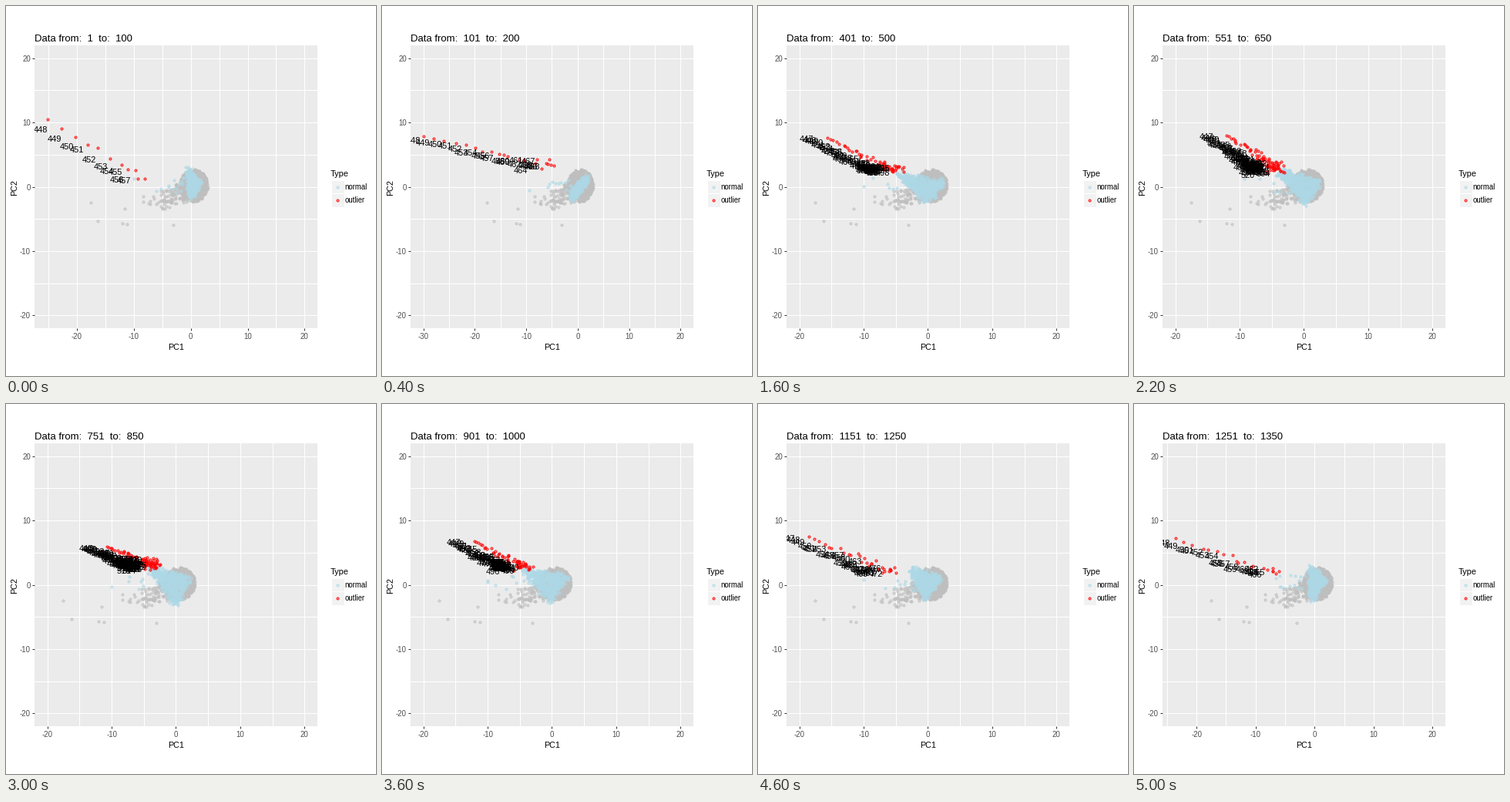
A matplotlib script that plays this animation: 480x480 px, repeating every 5200 ms.

```python
import numpy as np
import matplotlib.pyplot as plt
from matplotlib.animation import FuncAnimation
from matplotlib.patches import Rectangle
from matplotlib.transforms import ScaledTranslation

SIZE, DPI = 480, 100
FRAMES, STEP_MS = 26, 200
LEFT, TOP, SIDE = 37, 51, 367
GRAY, BLUE, RED = (0.745,) * 3, (0.678, 0.847, 0.902), (1, 0, 0)
FIRST_ID = 447

# Key poses by window: corners of the normal cloud, then the far and near
# ends of the outlier trail and how many outliers lie on it.
POSES = {
    0: [(-0.5, 2.6), (0, -1.5), (1.4, 0.6), (-25.2, 10.5), (-8.5, 1.4), 11],
    2: [(-1.4, -1.9), (0.2, 0), (1.8, 1.4), (-30, 7.8), (-5, 3.4), 22],
    5: [(-5.2, 1), (-0.6, -1.8), (2.7, 0.6), (-19.3, 7.3), (-6, 2.2), 34],
    11: [(-4.2, 2.8), (0.2, -2.7), (2.3, 0.8), (-12, 8), (-4.5, 3), 78],
    15: [(-4.2, 2.8), (0, -3.2), (2.1, 1), (-10.7, 5.9), (-3.8, 3.3), 84],
    21: [(-4.6, 1.9), (-0.4, -1.9), (2.2, 1.6), (-13.5, 7.7), (-5, 2.2), 42],
    25: [(-0.8, 2.9), (-0.6, -2.2), (1.6, 0.7), (-23.6, 7.2), (-7, 2), 20],
}
KEYS = sorted(POSES)
TABLE = np.array([np.hstack(POSES[k]) for k in KEYS])

plt.rcParams["font.family"] = "Liberation Sans"
plt.rcParams["axes.unicode_minus"] = False


def px(n):
    """Pixels to points."""
    return n * 72 / DPI


def scatter_noise(rng, n):
    return np.clip(rng.normal(size=(n, 2)), -1.9, 1.9)


def base_cloud():
    """Round core, a thinning tail to the lower left and a few far points."""
    rng = np.random.default_rng(4)
    angle = rng.uniform(0, 2 * np.pi, 800)
    r = rng.random(800) ** 0.6
    core = np.c_[0.5 + 2.5 * r * np.cos(angle), 0.2 + 2.5 * r * np.sin(angle)]
    x = -0.5 - np.minimum(rng.exponential(2.4, 130), rng.uniform(4, 8, 130))
    tail = np.c_[x, 0.3 * x - 0.3 + rng.uniform(-1.8, 1.5, 130)]
    far = [(-17.6, -2.5), (-16.3, -5.3), (-12, -5.7), (-11.2, -5.8),
           (-11.6, -3.4), (-3.1, -5.9)]
    return np.vstack([core, tail, far])


def normal_cloud(rng, corners):
    """Filled triangle with soft edges and some strays to the left."""
    mix = rng.dirichlet((0.8, 0.8, 0.8), 520)
    body = mix @ corners + 0.33 * scatter_noise(rng, 520)
    body[:, 0] = np.minimum(body[:, 0], 2.9)
    x = -1 - np.minimum(rng.exponential(2.5, 16), 9)
    return np.vstack([body, np.c_[x, rng.uniform(-1, 1.5, 16)]])


def outlier_trail(rng, far, near, n):
    """Points that crowd together and spread out towards the near end."""
    power = 1.3 + n / 40
    t = (1 - (1 - np.linspace(0, 1, n)) ** power)[:, None]
    trail = far + t * (near - far) + t * scatter_noise(rng, n) * (0.8, 0.5)
    trail[:, 0] = np.maximum(trail[:, 0], far[0])
    return trail


def state(k):
    pose = np.array([np.interp(k, KEYS, col) for col in TABLE.T])
    rng = np.random.default_rng(100 + k)
    points = pose[:10].reshape(5, 2)
    return (normal_cloud(rng, points[:3]),
            outlier_trail(rng, points[3], points[4], round(pose[10])))


fig = plt.figure(figsize=(SIZE / DPI, SIZE / DPI), dpi=DPI, facecolor="white")
page = fig.add_axes([0, 0, 1, 1])
page.set(xlim=(0, SIZE), ylim=(SIZE, 0))
page.axis("off")
ax = fig.add_axes([LEFT / SIZE, 1 - (TOP + SIDE) / SIZE,
                   SIDE / SIZE, SIDE / SIZE], facecolor="#EBEBEB")
ax.set_axisbelow(True)
for spine in ax.spines.values():
    spine.set_visible(False)
ax.tick_params(which="major", length=px(3), width=px(1), pad=px(2),
               color="#333333", labelcolor="#4D4D4D", labelsize=px(9.7))
ax.tick_params(axis="x", which="major", pad=px(3.5))
ax.tick_params(which="minor", length=0)
ax.grid(True, which="both", color="white", linewidth=px(1))
ax.set_ylim(-22, 22)
ax.set_yticks(range(-20, 21, 10))
ax.set_yticks(range(-15, 16, 10), minor=True)


def write(x, y, s, size, **kw):
    return page.text(x, y, s, fontsize=px(size), **kw)


def dots(axes, points, color, z):
    return axes.scatter(points[:, 0], points[:, 1], s=px(3) ** 2, zorder=z,
                        facecolors=[(*color, 0.3)],
                        edgecolors=[(*color, 0.9)], linewidths=px(1))


title = write(37, 46, "", 13.1)
write(220.5, 446, "PC1", 10.8, ha="center")
write(11, 235.5, "PC2", 10.8, ha="center", va="center", rotation=90)
write(421, 221, "Type", 11)
for top, name, color in ((226, "normal", BLUE), (243.3, "outlier", RED)):
    page.add_patch(Rectangle((421.5, top), 17.3, 17.3, facecolor="#F2F2F2",
                             edgecolor="white", linewidth=px(1)))
    dots(page, np.array([[430.2, top + 8.7]]), color, 3)
    write(439.8, top + 12, name, 9.6)

dots(ax, base_cloud(), GRAY, 3)
cloud = dots(ax, np.zeros((1, 2)), BLUE, 4)
outliers = dots(ax, np.zeros((1, 2)), RED, 5)
shift = ax.transData + ScaledTranslation(-27 / DPI, -5.3 / DPI,
                                         fig.dpi_scale_trans)
labels = []


def update(k):
    normal, trail = state(k)
    cloud.set_offsets(normal)
    outliers.set_offsets(trail)

    low = min(-20, trail[:, 0].min())
    margin = (20 - low) * 0.05
    lo = low - margin
    ax.set_xticks([v for v in range(-30, 21, 10) if v >= lo])
    ax.set_xticks([v for v in range(-35, 21, 10) if v >= lo], minor=True)
    ax.set_xlim(lo, 20 + margin)

    title.set_text(f"Data from:  {50 * k + 1}  to:  {50 * k + 100}")
    while labels:
        labels.pop().remove()
    for i, (x, y) in enumerate(trail):
        labels.append(ax.text(x, y, str(FIRST_ID + i), fontsize=px(11),
                              ha="center", va="baseline", transform=shift,
                              zorder=6, clip_on=True))
    return []


anim = FuncAnimation(fig, update, frames=FRAMES, interval=STEP_MS,
                     repeat=True, repeat_delay=0, blit=False)
plt.show()
```
